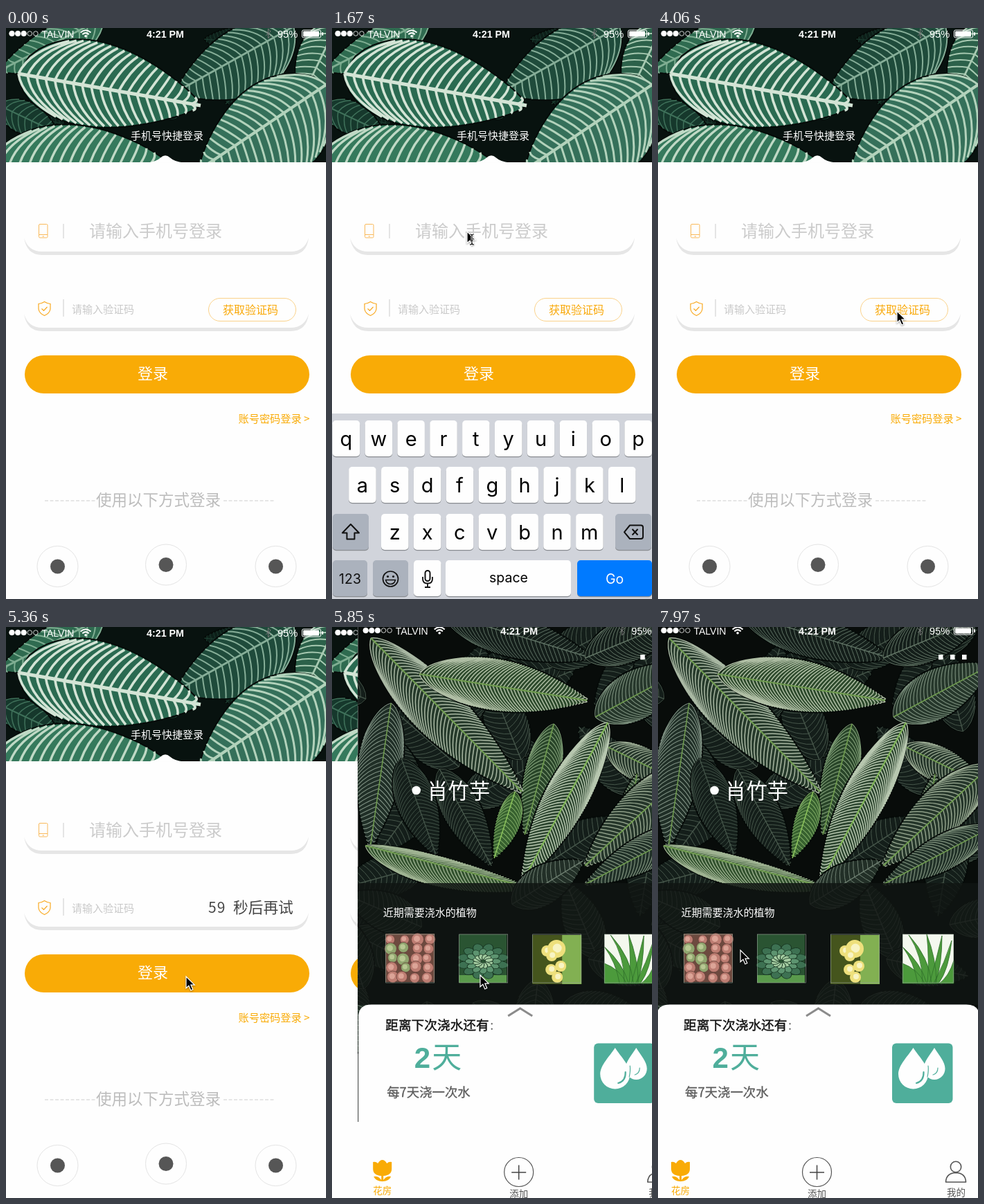
Recreate the animation shown at these times as an HTML page. Size 462x825 px, loop 8000 ms.

```html
<!DOCTYPE html>
<html lang="zh">
<head>
<meta charset="utf-8">
<title>登录</title>
<style>
html, body { margin: 0; width: 100%; height: 100%; overflow: hidden; background: #fefefe; }
svg { display: block; width: 100vw; height: 100vh; }
text { font-family: "Noto Sans CJK SC", "Noto Sans CJK", sans-serif; white-space: pre; }
.en { font-family: Inter, sans-serif; }
.bar { font-family: "Liberation Sans", Arial, sans-serif; }
</style>
</head>
<body>
<svg id="stage" viewBox="0 0 462 825" xmlns="http://www.w3.org/2000/svg"></svg>
<script>
const LOOP = 8000, ORANGE = '#f9ab06', TEAL = '#4fae9b';

const text = (x, y, size, str, fill, more = '') =>
  `<text x="${x}" y="${y}" font-size="${size}" fill="${fill}" ${more}>${str}</text>`;
const rect = (x, y, w, h, fill, r = 0, more = '') =>
  `<rect x="${x}" y="${y}" width="${w}" height="${h}" rx="${r}" fill="${fill}" ${more}/>`;
const disc = (x, y, r, fill, more = '') => `<circle cx="${x}" cy="${y}" r="${r}" fill="${fill}" ${more}/>`;
const line = (d, stroke, w = 1, more = '') =>
  `<path d="${d}" fill="none" stroke="${stroke}" stroke-width="${w}" ${more}/>`;
const shape = (d, fill, more = '') => `<path d="${d}" fill="${fill}" ${more}/>`;
const MID = 'text-anchor="middle"', BOLD = 'font-weight="500"', LIGHT = 'font-weight="300"';

let seed = 7;
const rnd = (a, b) => {
  seed = (seed * 16807) % 2147483647;
  return a + (b - a) * seed / 2147483647;
};

// Leaf from base a to tip b, half widths w1 and w2, with n curved veins per side
function leaf(ax, ay, bx, by, w1, w2, fill, vein, n = 20, sw = 1.5, rib = vein, round = .8) {
  const dx = bx - ax, dy = by - ay, len = Math.hypot(dx, dy);
  const at = (u, v) => `${(ax + dx * u - dy / len * v).toFixed(1)} ${(ay + dy * u + dx / len * v).toFixed(1)}`;
  const edge = u => Math.pow(Math.abs(Math.sin(Math.PI * Math.pow(Math.min(u, 1), round))), .75);
  let rim = [], veins = '';
  for (let i = 0; i <= 24; i++) rim.push(at(i / 24, w1 * edge(i / 24)));
  for (let i = 24; i >= 0; i--) rim.push(at(i / 24, -w2 * edge(i / 24)));
  for (let i = 0; i < n; i++) {
    const u = i / n, e = u + .24 * (1 - u);
    for (const w of [w1, -w2])
      veins += `M${at(u, 0)}Q${at(u + .04, w * edge(e) * .6)} ${at(e, w * edge(e) * .97)}`;
  }
  return shape(`M${rim.join('L')}Z`, fill, 'stroke="#050a08" stroke-width="2"') + line(veins, vein, sw) +
    line(`M${at(0, 0)}L${at(1, 0)}`, rib, sw * 1.4);
}

// Dim leaves scattered behind the large ones
function thicket(n, y0, y1, size, fill, vein) {
  let s = '';
  for (let i = 0; i < n; i++) {
    const x = rnd(-20, 470), y = rnd(y0, y1), a = rnd(0, 6.28);
    s += leaf(x, y, x + size * Math.cos(a), y + size * Math.sin(a), size * .24, size * .24, fill, vein, 16, 1);
  }
  return s;
}

function status(dy) {
  let s = '';
  for (let i = 0; i < 5; i++)
    s += disc(8.5 + i * 8.6, 8, i < 3 ? 3.8 : 3.3, i < 3 ? '#fff' : 'none', 'stroke="#fff" stroke-width=".8"');
  s += text(51.5, 14, 14, 'TALVIN', '#fff', 'class="bar"');
  s += line('M107.5 6.5Q115 0 122.5 6.5M110.3 9.3Q115 5 119.7 9.3', '#fff', 2) + disc(115, 11.8, 1.8, '#fff');
  s += text(230, 14, 14.3, '4:21 PM', '#fff', 'class="bar" font-weight="700" ' + MID);
  s += line('M375 5L382 11L378.5 15V1L382 5L375 11', '#777', 1);
  s += text(392, 14, 14.6, '95%', '#fff', 'class="bar"');
  s += rect(427.5, 3, 27, 11, 'none', 2, 'stroke="#fff"') + rect(429, 4.5, 23, 8, '#fff', 1) + rect(456, 6, 2, 5, '#fff', 1);
  return `<g transform="translate(0 ${dy})">${s}</g>`;
}

function loginPage() {
  let s = rect(0, 0, 462, 825, '#fefefe') + '<g clip-path="url(#hero)">' + rect(0, 0, 462, 194, '#08120f');
  s += thicket(8, 0, 190, 90, '#0d1f19', '#1b3a2e');
  s += leaf(-10, 112, 75, 152, 24, 24, '#16382c', '#3f715a', 9, 1.5);
  s += leaf(140, -14, -10, 62, 24, 36, '#2f6b50', '#7fae92', 13, 2);
  s += leaf(480, -10, 425, 105, 35, 45, '#2c614a', '#a7c9b1', 12, 2);
  s += leaf(415, -2, 246, 92, 40, 60, '#1f4b3b', '#86ae98', 18, 2);
  s += leaf(462, 82, 280, 204, 58, 84, '#35705a', '#b2d2bb', 18, 3);
  s += leaf(18, 66, 281, 112, 58, 66, '#2a6a51', '#d3e4d5', 20, 3.6, '#d3e4d5', .72);
  s += leaf(-25, 200, 236, 198, 30, 60, '#35795c', '#bfd9c5', 18, 3.4);
  s += '</g>' + shape('M205 194.500Q217 193 223 187.500Q230 181 237 187.500Q243 193 256 194.500Z', '#fefefe');
  s += status(0) + text(232.5, 161, 15, '手机号快捷登录', '#fff', MID);

  for (const y of [0, 110])
    s += shape(`M26 ${303 + y}Q30 ${328 + y} 52 ${328 + y}H411Q434 ${328 + y} 437 ${303 + y}Q431 ${323 + y} 411 ${323 + y}H52Q32 ${323 + y} 26 ${303 + y}Z`, '#e6e6e6');
  s += rect(47.5, 283.5, 12.5, 19.5, 'none', 1.5, 'stroke="#f9b95a"') + line('M47.500 298.500H60M52.500 301H55', '#f9b95a');
  s += line('M83 283V304M83 392V417', '#d8d8d8', 1.3);
  s += text(120, 302, 24, '请输入手机号登录', '#cbcbcb', LIGHT);
  s += line('M55.500 395.500Q60 398.500 64 398.500V406Q63 412.500 55.500 415.500Q48 412.500 47 406V398.500Q51 398.500 55.500 395.500ZM51.500 405.500L54.500 408.500L59.500 403', '#f9a921', 1.2);
  s += text(95, 412, 15, '请输入验证码', '#c9c9c9', LIGHT);
  s += rect(292.5, 390.5, 126, 33, '#fefefe', 16.5, 'stroke="#fbd28a"');
  s += text(353, 413, 16, '获取验证码', '#f9a90a', MID + ' ' + BOLD);
  s += '<g id="wait">' + rect(288, 388, 133, 37, '#fefefe') +
    text(292, 413, 21, '59', '#454545', LIGHT + ' letter-spacing="1"') + text(328, 413, 21.7, '秒后再试', '#454545', LIGHT) + '</g>';
  s += rect(27, 473, 411, 55, ORANGE, 27.5) + text(212, 507, 22, '登录', '#fff', MID);
  s += text(438.5, 570, 15.2, '账号密码登录 &gt;', ORANGE, 'text-anchor="end"');
  s += line('M56 683H129M314 683H387', '#cfcfcf', 1.2, 'stroke-dasharray="5 2.5"');
  s += text(220, 690, 22.5, '使用以下方式登录', '#bcbcbc', MID + ' ' + LIGHT);
  for (const [x, y] of [[74.5, 778], [231, 775.5], [389.5, 778]])
    s += disc(x, y, 29.5, 'none', 'stroke="#e4e4e4"') + disc(x, y, 10.5, '#565656');
  return s;
}

function keyboard() {
  let s = rect(0, 557, 462, 268, '#d1d4db');
  const key = (x, y, w, fill) => rect(x, y + 1.3, w, 52, '#898c91', 5) + rect(x, y, w, 52, fill, 5);
  const row = (str, x, y) => [...str].forEach((c, i) => {
    const kx = x + i * 46.85;
    s += key(kx, y, 39.5, '#fefefe') + text(kx + 19.7, y + 36.5, 29, c, '#000', 'class="en" ' + MID);
  });
  row('qwertyuiop', .7, 567);
  row('asdfghjkl', 24.2, 634);
  row('zxcvbnm', 71, 702);
  const grey = '#abb2bd';
  s += key(1, 702, 52, grey) + key(409, 702, 52, grey) + key(1, 769, 50, grey) + key(59, 769, 51, grey);
  s += key(118, 769, 39.5, '#fefefe') + key(164, 769, 181, '#fefefe') + key(354, 769, 108, '#007aff');
  s += line('M27 717L39 729.500H32.500V738.500H21.500V729.500H15Z', '#111', 2, 'stroke-linejoin="round"');
  s += line('M430 718.500H446Q449 718.500 449 721.500V735Q449 738 446 738H430L422 728.300ZM433.500 724L441.500 732.500M441.500 724L433.500 732.500', '#111', 2, 'stroke-linejoin="round"');
  s += disc(84.5, 796, 11, 'none', 'stroke="#111" stroke-width="1.7"') + disc(80.5, 792.5, 1.6, '#111') + disc(88.5, 792.5, 1.6, '#111') +
    line('M77.500 797.500H91.500Q90 803.500 84.500 803.500Q79 803.500 77.500 797.500Z', '#111', 1.5);
  s += rect(134.5, 784, 7, 15, 'none', 3.5, 'stroke="#111" stroke-width="2"') +
    line('M131 793V796Q131 802.500 138 802.500Q145 802.500 145 796V793M138 803V808M134 808H142', '#111', 1.8);
  const label = (x, y, str, fill) => text(x, y, 19.5, str, fill, 'class="en" ' + MID);
  return s + label(26, 803, '123', '#111') + label(255, 801, 'space', '#000') + label(408, 803, 'Go', '#fff');
}

function thumbs() {
  let s = rect(37, 443, 71, 70, '#6d4a3f');
  for (let i = 0; i < 20; i++) {
    const x = 46 + (i % 4) * 17.5 + rnd(-3, 3), y = 450 + (i >> 2) * 14 + rnd(-2, 2), r = rnd(6.5, 9);
    const green = x < 72 && y > 455 && y < 492;
    s += disc(x, y, r, green ? '#90a66f' : '#bd7d72', 'stroke="#643f38" stroke-width=".8"') +
      disc(x - 1, y - 1, r * .5, green ? '#b9c893' : '#dca497');
  }
  s += rect(143, 444, 69, 70, '#2a5432') + rect(143, 503, 69, 11, '#5a9a4c');
  for (let r = 3; r > 0; r--)
    for (let i = 0; i < 12; i++)
      s += `<ellipse cx="${r * 9}" rx="${4 + r * 2}" ry="${2 + r * 1.8}" fill="${['', '#a3cba0', '#5d9470', '#3d7152'][r]}" stroke="#173421" transform="translate(178 483) scale(1 .7) rotate(${i * 30 + r * 15})"/>`;
  s += rect(249, 445, 71, 71, '#45551d') + rect(292, 445, 28, 71, '#82b052');
  for (const [x, y, r] of [[270, 468, 8], [284, 465, 13], [277, 475, 8], [276, 495, 8], [290, 490, 8], [285, 506, 8]])
    s += disc(x, y, r, '#eee07c') + disc(x + 1, y - 1, r * .5, '#f8f4c4');
  s += rect(353, 444, 74, 71, '#f4f8ee');
  s += shape('M353 486Q375 494 385 515H353ZM353 462Q380 486 388 515H375Q370 485 353 462ZM362 445Q392 478 395 515H382Q382 475 362 445ZM388 444Q402 480 402 515H389Q392 480 388 444ZM410 446Q410 490 400 515H392Q402 480 410 446ZM424 453Q420 495 405 515H398Q414 485 424 453ZM427 482Q420 505 406 515H427Z', '#4c9a3c', 'stroke="#2f6f2a" stroke-width=".8"');
  for (const x of [37, 143, 249, 353]) s += rect(x + .5, 444, x == 353 ? 73 : 70, 70, 'none', 0, 'stroke="#9aa89a" stroke-width=".6"');
  return s;
}

function gardenPage() {
  const dark = '#141e1a', mid = '#26372b', pale = '#9dad95', rib = '#6f9c4f';
  let s = rect(-3, 0, 465, 825, '#fefefe') + '<g clip-path="url(#plants)">' + rect(-3, 0, 465, 715, '#080c0a');
  s += thicket(26, 0, 380, 130, dark, '#46564a');
  s += leaf(120, -20, 335, 45, 34, 30, dark, '#5f7264', 34, 1);
  s += leaf(325, 45, 470, -15, 32, 32, dark, '#637666', 26, 1);
  s += leaf(340, 130, 480, 55, 36, 36, mid, '#7d917e', 28, 1.1, rib);
  s += leaf(45, 110, 15, 318, 36, 30, '#202f27', '#7f9183', 32, 1.1, rib);
  s += leaf(60, 190, 110, 330, 30, 28, dark, '#46574b', 26, .9);
  s += leaf(115, 205, 190, 345, 28, 28, dark, '#4c5d50', 26, .9);
  s += leaf(355, 172, 475, 230, 28, 24, mid, pale, 26, 1.2, rib);
  s += leaf(385, 310, 400, 212, 20, 18, '#2d452f', pale, 20, 1.1, rib);
  s += leaf(480, 200, 325, 345, 36, 34, mid, pale, 34, 1.3, rib);
  s += leaf(480, 290, 325, 372, 26, 26, '#213128', '#839680', 30, 1.1, rib);
  s += leaf(280, 140, 238, 300, 24, 28, '#294529', '#7c9a73', 28, 1.2, rib);
  s += leaf(224, 238, 194, 334, 14, 22, '#37612f', '#7aa561', 18, 1.1, '#8cc45c');
  s += leaf(16, 16, 234, 238, 44, 34, '#263a2b', '#a9b8a3', 48, 1.5, rib, .85);
  s += leaf(86, 68, 328, 106, 36, 40, '#2d4a2c', '#afbea4', 48, 1.5, rib, .85);
  s += leaf(358, 138, 235, 368, 34, 30, '#2c452f', '#b7c7af', 50, 1.5, '#7fb655', .9);
  s += leaf(8, 316, 250, 378, 32, 12, '#32522e', '#9fb392', 46, 1.3, rib);
  s += thicket(12, 400, 560, 120, '#222f27', '#6f8072');
  s += rect(-3, 370, 465, 176, '#101513', 0, 'opacity=".84"') + '</g>' + status(-3);
  for (const x of [405, 422, 439]) s += rect(x, 40, 6.5, 7, '#fff');
  s += disc(81.5, 236, 6.3, '#fff') + text(97, 247.5, 30.4, '肖竹芋', '#fff', LIGHT);
  s += text(33.5, 418, 15, '近期需要浇水的植物', '#fff') + thumbs();

  s += shape('M-2 825V563Q-2 545.500 17 545.500H445Q464 545.500 464 563V825Z', '#fefefe');
  s += line('M214 562L231.500 551L249 562', '#8b8b8b', 3);
  s += text(37, 582, 18.7, '距离下次浇水还有', '#111', 'stroke="#111" stroke-width=".4"') + text(188, 582, 18, ':', '#666');
  s += text(78.5, 637, 42, '2', TEAL, 'class="bar" font-weight="700"') + text(104, 637, 43, '天', TEAL, LIGHT);
  s += text(39, 679, 18.4, '每7天浇一次水', '#5c5c5c', 'stroke="#5c5c5c" stroke-width=".3"');
  s += rect(338, 601.5, 87.5, 86.5, TEAL, 6);
  s += shape('M399 608C405 618 414.500 628 414.500 638A15.500 16 0 0 1 383.500 638C383.500 628 393 618 399 608Z', '#fefefe');
  s += shape('M368.500 608C376 620 390 633 390 646A21.500 21.500 0 0 1 347 646C347 633 361 620 368.500 608Z', '#fefefe');
  s += line('M383.500 643Q384 656 373 659', TEAL, 2.2, 'stroke-linecap="round"');
  s += line('M390 634Q391 640 389 650M404 637Q404 645 397 647', TEAL, 1.2, 'stroke-linecap="round"');

  s += shape('M19 773Q23 772 26 775Q29 770 32.500 770Q36 770 39 775Q42 772 46 773V783Q46 792 34 793V799Q38 793 45 794Q42 801 32.500 801Q23 801 20 794Q27 793 31 799V793Q19 792 19 783Z', ORANGE);
  s += text(32.5, 818.5, 13.5, '花房', ORANGE, MID);
  s += disc(229.5, 787.5, 21, '#fefefe', 'stroke="#555" stroke-width="1.2"') + line('M219 788H240M229.500 777.500V798.500', '#444', 1.5);
  s += text(229.5, 823.5, 13.5, '添加', '#555', MID);
  s += disc(430, 780, 7.7, 'none', 'stroke="#555" stroke-width="1.6"') + line('M415.500 802Q416 789 430 788.500Q444 789 444.500 802Z', '#555', 1.6, 'stroke-linejoin="round"');
  return s + text(430.5, 821.5, 13.5, '我的', '#555', MID);
}

const stage = document.getElementById('stage');
const bar = 'M4 4Q7 4 7 6Q7 4 10 4M7 6V17M4 19Q7 19 7 17Q7 19 10 19M5.500 13H8.500';
stage.innerHTML = `<defs>
  <clipPath id="hero"><rect width="462" height="194"/></clipPath>
  <clipPath id="plants"><rect x="-3" width="466" height="715"/></clipPath></defs>
  ${loginPage()}<g id="keys">${keyboard()}</g><g id="garden">${gardenPage()}</g>
  <g id="cursor">${shape('M0 0V16.800L3.900 13.200L6.800 20L9.800 18.700L6.900 12.100H12.200Z', '#000', 'stroke="#fff" stroke-width="1.2" style="filter:drop-shadow(0 1px 1px #0006)"')}
  <g id="beam">${line(bar, '#fff', 3)}${line(bar, '#111', 1.2)}</g></g>`;

// Pointer stops: time, x, y
const path = [
  [120, 362, 768], [500, 262, 495], [920, 178, 281], [1150, 195, 294], [2530, 195, 294],
  [3080, 236, 574], [3340, 223, 557], [3480, 223, 557], [4060, 345, 409], [4400, 345, 409],
  [5000, 264, 505], [5080, 260, 505], [5570, 260, 505], [5850, 214, 503], [6380, 184, 629],
  [6500, 184, 629], [6920, 308, 797], [7310, 216, 774], [7680, 99, 545], [7970, 119, 467], [LOOP, 119, 467]
];
const slope = (i, k) => (path[i + 1][k] - path[i][k]) / (path[i + 1][0] - path[i][0]);
function tangent(i, k) {
  if (i == 0 || i == path.length - 1) return 0;
  const a = slope(i - 1, k), b = slope(i, k);
  return a * b <= 0 ? 0 : 2 * a * b / (a + b);
}
function along(t, k) {
  let i = 0;
  while (i < path.length - 2 && t >= path[i + 1][0]) i++;
  const p = path[i], q = path[i + 1], h = q[0] - p[0], u = Math.max(0, (t - p[0]) / h);
  const v = 1 - u;
  return v * v * (1 + 2 * u) * p[k] + u * u * (3 - 2 * u) * q[k] + h * u * v * (v * tangent(i, k) - u * tangent(i + 1, k));
}
const swing = (t, a, b) => .5 - Math.cos(Math.PI * Math.min(1, Math.max(0, (t - a) / (b - a)))) / 2;

const [keys, garden, cursor, beam, wait] = ['keys', 'garden', 'cursor', 'beam', 'wait'].map(id => document.getElementById(id));
const move = (el, x, y) => el.setAttribute('transform', `translate(${x.toFixed(2)} ${y.toFixed(2)})`);
const show = (el, on) => el.setAttribute('visibility', on ? 'visible' : 'hidden');

function draw(t) {
  const up = swing(t, 1430, 1670) - swing(t, 3350, 3620);
  move(keys, 0, 270 * (1 - up));
  move(wait, 178 * (1 - swing(t, 4180, 4450)), 0);
  move(garden, 466 * (1 - swing(t, 5565, 5918)), 0);
  move(cursor, along(t, 1), along(t, 2));
  show(cursor, t >= 120);
  show(beam, t >= 1310 && t < 2160);
}

const start = performance.now();
function tick() {
  draw((performance.now() - start) % LOOP);
  requestAnimationFrame(tick);
}
tick();
</script>
</body>
</html>
```
